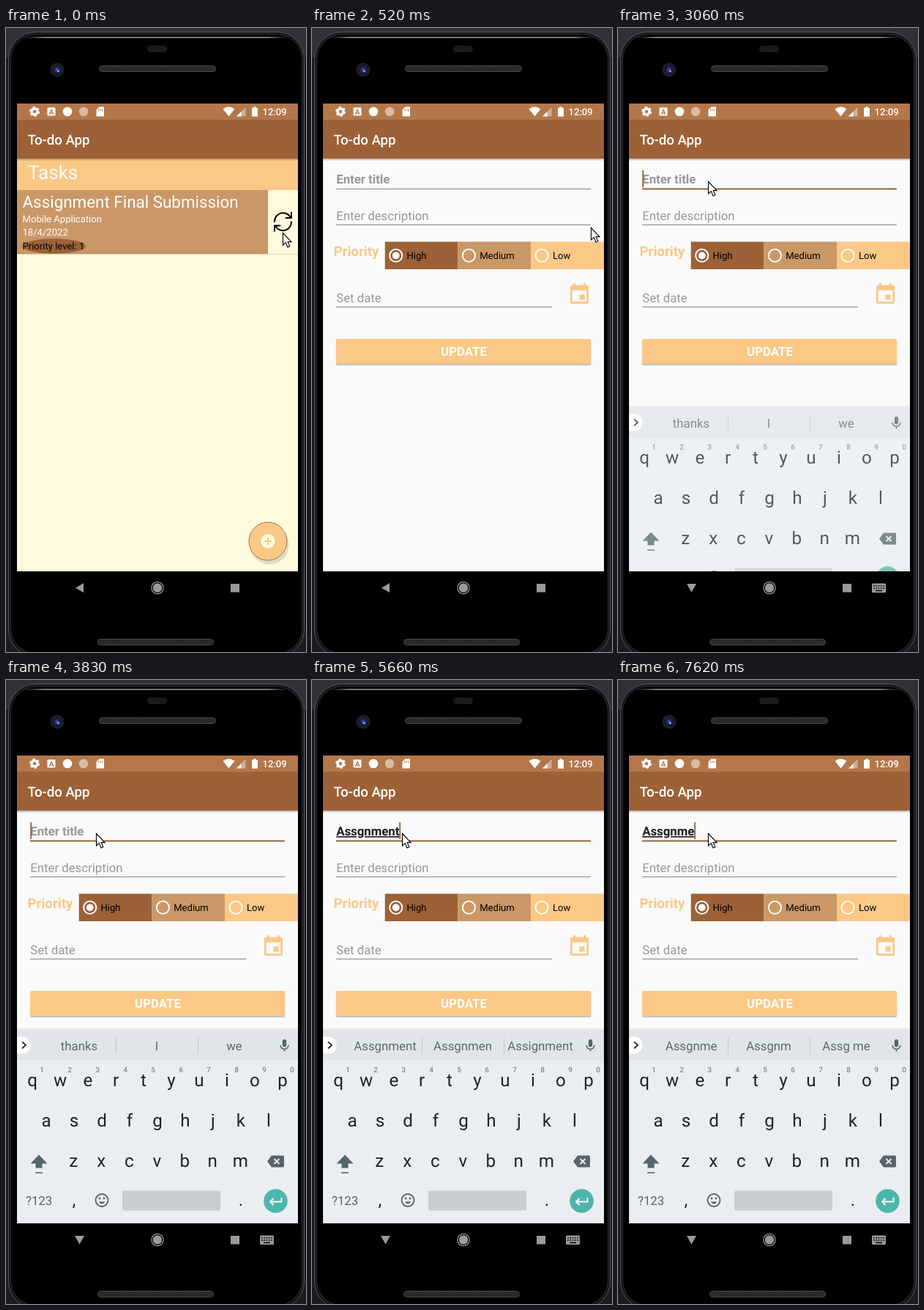
Animation, 410 px wide and 851 px high, one loop 8 s. Source, as an HTML page:

```html
<!DOCTYPE html>
<html lang="en">
<head>
<meta charset="utf-8">
<title>To-do App</title>
<style>
  html, body { margin: 0; width: 100%; height: 100%; overflow: hidden; background: #000; }
  svg { display: block; font-family: Roboto, sans-serif; text-rendering: geometricPrecision; }
  .b { font-weight: 700; }
  .mid { text-anchor: middle; }
  .s14 { font-size: 13.08px; }
  .s18 { font-size: 16.8px; }
  .hint { fill: #989898; }
  .line { stroke: #858585; }
  .key { font-size: 24.2px; fill: #17262c; }
  .num { font-size: 10px; font-weight: 500; fill: #7d888d; }
  #typed { fill: #1c1c1c; text-decoration: underline; text-decoration-skip-ink: none; }
</style>
</head>
<body>
<svg width="410" height="851" viewBox="0 0 410 851">
  <defs>
    <clipPath id="screen"><rect x="15" y="103" width="384" height="638"/></clipPath>
    <linearGradient id="shine">
      <stop offset="0" stop-color="#555a5f" stop-opacity="0"/>
      <stop offset=".08" stop-color="#8b9096"/>
      <stop offset=".92" stop-color="#8b9096"/>
      <stop offset="1" stop-color="#555a5f" stop-opacity="0"/>
    </linearGradient>
    <linearGradient id="drop" x2="0" y2="1">
      <stop offset="0" stop-opacity=".3"/>
      <stop offset="1" stop-opacity="0"/>
    </linearGradient>
    <radialGradient id="lens">
      <stop offset="0" stop-color="#5568c8"/>
      <stop offset=".45" stop-color="#1b2560"/>
      <stop offset="1" stop-color="#15161c"/>
    </radialGradient>
    <pattern id="mesh" width="3" height="4" patternUnits="userSpaceOnUse">
      <rect width="3" height="4" fill="#1b1a18"/>
      <path d="M0 4L3 0" stroke="#514d47"/>
    </pattern>
  </defs>

  <!-- phone body -->
  <rect width="410" height="851" fill="#303137"/>
  <rect y="40" width="410" height="811" fill="#1b1c1e"/>
  <rect x="3.5" y="5.5" width="404" height="852" rx="37" fill="#161719" stroke="#54575b"/>
  <rect x="6.5" y="9" width="398" height="844" rx="34" fill="#000" stroke="#2b2d30"/>
  <rect x="22" y="12" width="366" height="1.6" fill="url(#shine)"/>
  <rect x="193" y="24" width="27" height="9" rx="4.5" fill="#1a1a1b"/>
  <circle cx="70" cy="57" r="9.5" fill="#202024"/>
  <circle cx="70" cy="57" r="7" fill="url(#lens)"/>
  <circle cx="71.5" cy="59" r="1.3" fill="#a5b2f2"/>
  <g fill="url(#mesh)" stroke="#4a4843">
    <rect x="127.5" y="51.5" width="159" height="8" rx="4"/>
    <rect x="125.5" y="833.5" width="158" height="8" rx="4"/>
  </g>

  <!-- navigation bar -->
  <g fill="#9a9a9a">
    <path id="back" d="M95 763.5L106 757V770Z"/>
    <circle cx="207" cy="763.5" r="6.2"/>
    <circle cx="207" cy="763.5" r="8.2" fill="none" stroke="#9a9a9a" stroke-width="1.2"/>
    <rect x="307" y="758" width="12" height="11.5"/>
    <g id="switch">
      <rect x="347" y="757.5" width="19" height="12.5" rx="1.5"/>
      <path d="M349 760.8H364M349 764H364" stroke="#000" stroke-width="1.6" stroke-dasharray="1.8 1.5"/>
      <path d="M352 767.4H361" stroke="#000" stroke-width="1.5"/>
    </g>
  </g>

  <g clip-path="url(#screen)">
    <g id="list">
      <rect x="15" y="178" width="384" height="563" fill="#fffadd"/>
      <rect x="15" y="178" width="384" height="43" fill="#fbc886"/>
      <text x="30" y="206" font-size="26" fill="#fff">Tasks</text>
      <rect x="15" y="221" width="343" height="87" fill="#c99866"/>
      <path d="M15 308.5H399" stroke="#dcd7c2"/>
      <g fill="#fff" class="s14">
        <text x="22.5" y="245" font-size="22.4">Assignment Final Submission</text>
        <text x="22.5" y="265">Mobile Application</text>
        <text x="22.5" y="283">18/4/2022</text>
      </g>
      <ellipse cx="66" cy="297.5" rx="43" ry="10.3" fill="#9c6137"/>
      <text x="22.5" y="302" class="s14">Priority level: 1</text>
      <g fill="none" stroke="#000" stroke-width="2" stroke-linecap="round" stroke-linejoin="round">
        <path id="turn" d="M367 264A11.5 11.5 0 0 1 388.5 258M390 251.5V259H382.5"/>
        <use href="#turn" transform="rotate(180 378.5 264.2)"/>
      </g>
      <circle cx="360" cy="705" r="26.5" fill="#000" opacity=".12"/>
      <circle cx="358" cy="700" r="26" fill="#fbc886" stroke="#76644c" stroke-width=".8"/>
      <circle cx="358" cy="700" r="9.7" fill="#fffadd"/>
      <path d="M353 700H363M358 695V705" stroke="#fbc886" stroke-width="2"/>
    </g>

    <g id="form">
      <rect x="15" y="178" width="384" height="563" fill="#fafafa"/>
      <text id="title" x="33.2" y="212" class="b s18 hint">Enter title</text>
      <text id="typed" x="33.2" y="212" class="b s18"></text>
      <path id="rule" d="M33 219.5H381"/>
      <rect id="caret" y="194" width="1.8" height="23" fill="#9c6137"/>
      <text x="33.2" y="262" class="s18 hint">Enter description</text>
      <text x="33.2" y="374" class="s18 hint">Set date</text>
      <path class="line" d="M33 268.5H381M33 380.5H328"/>
      <text x="29.5" y="311" font-size="18.7" class="b" fill="#fbc886">Priority</text>
      <g id="radios" class="s14"></g>
      <path fill="#fbc886" transform="translate(348.7 346.6) scale(1.4)"
        d="M17 12h-5v5h5zM16 1v2H8V1H6v2H5a2 2 0 0 0-2 2V19a2 2 0 0 0 2 2H19a2 2 0 0 0 2-2V5a2 2 0 0 0-2-2h-1V1zM19 19H5V8H19z"/>
      <rect x="32.5" y="425.5" width="349" height="35" rx="2.5" fill="#000" opacity=".1"/>
      <rect x="33" y="424.5" width="348" height="35" rx="2" fill="#000" opacity=".22"/>
      <rect x="33" y="424" width="348" height="34.5" rx="2" fill="#fbc886"/>
      <text x="207.5" y="447" class="b s18 mid" fill="#fff">UPDATE</text>
    </g>

    <!-- status and app bars -->
    <rect x="15" y="103" width="384" height="22" fill="#b3774a"/>
    <rect x="15" y="125" width="384" height="53" fill="#9c6137"/>
    <rect x="15" y="178" width="384" height="3.5" fill="url(#drop)"/>
    <text x="29.5" y="159" font-size="18.7" font-weight="500" fill="#fff">To-do App</text>
    <g fill="#fff">
      <circle cx="39" cy="114" r="4" fill="none" stroke="#fff" stroke-width="3.4"/>
      <circle cx="39" cy="114" r="6" fill="none" stroke="#fff" stroke-width="2" stroke-dasharray="3.1 3.18"/>
      <rect x="56.5" y="108.5" width="11" height="11" rx="1"/>
      <text x="62" y="117.6" class="b mid" font-size="10" fill="#b3774a">A</text>
      <circle cx="84" cy="114" r="6.3"/>
      <circle cx="106" cy="114" r="6.3" opacity=".5"/>
      <path d="M127.5 107.5H134V120.5H123.5V111.5Z"/>
      <path d="M126.5 110.5V113M129 110.5V113M131.5 110.5V113" stroke="#b3774a"/>
      <path d="M296.5 110.5Q304.5 104.5 312.5 110.5L304.5 120.5Z"/>
      <path d="M315 120.5L327.5 108V120.5Z" opacity=".4"/>
      <path d="M315 120.5L321.5 114V120.5Z"/>
      <path d="M336 109H338.2V107.5H341.8V109H344V120.8H336Z"/>
      <text x="350.5" y="119" font-size="13.1" font-weight="500">12:09</text>
    </g>

    <g id="board">
      <rect x="15" y="475" width="384" height="3" fill="#000" opacity=".06"/>
      <rect x="15" y="477" width="384" height="264" fill="#ebeef1"/>
      <rect x="15" y="477" width="384" height="41.5" fill="#e0e5e8"/>
      <path d="M15 486.5H22A11.5 11.5 0 0 1 22 509.5H15Z" fill="#fff"/>
      <path d="M22 493.5L27 498L22 502.5" fill="none" stroke="#263238" stroke-width="1.8"/>
      <path d="M150.5 487V510M262.5 487V510" stroke="#c0c7cb"/>
      <g id="words" class="s18 mid" fill="#5b6a71"></g>
      <g fill="#56656b" stroke="#56656b" stroke-width="0">
        <rect x="377.8" y="490" width="5.4" height="10.5" rx="2.7"/>
        <path d="M375 498A5.5 5.5 0 0 0 386 498M380.5 503.5V506.5" fill="none" stroke-width="1.5"/>
        <path d="M45 647.5L56.5 659.5H49.5V665.5H40.5V659.5H33.5Z"/>
        <path d="M40 672H50" stroke-width="1.6"/>
        <path d="M363 648.5H378.5Q380 648.5 380 650V663Q380 664.5 378.5 664.5H363L357 656.5Z"/>
        <path d="M366.5 653L373.5 660M373.5 653L366.5 660" stroke="#ebeef1" stroke-width="1.8"/>
        <circle cx="131" cy="709.5" r="8.5" fill="none" stroke-width="1.8"/>
        <circle cx="128" cy="707" r="1.4"/>
        <circle cx="134" cy="707" r="1.4"/>
        <path d="M126.5 711.5Q131 717.5 135.5 711.5Z"/>
        <text x="27" y="716" class="s18">?123</text>
      </g>
      <rect x="159" y="696.5" width="134" height="27" rx="2.5" fill="#c8cdd0"/>
      <circle cx="368.5" cy="710.5" r="16.3" fill="#4db6ac"/>
      <path d="M376.5 706V711.5H361.5M365.5 707L361 711.5L365.5 716" fill="none" stroke="#fff" stroke-width="1.9"/>
      <g id="keys" class="mid"></g>
    </g>
  </g>

  <path id="mouse" d="M.5.5V17L4.3 13.6L7 20L9.8 18.8L7.1 12.6H12Z" fill="#fff" stroke="#000" stroke-width="1.1"/>
</svg>
<script>
const $ = id => document.getElementById(id);
const show = (id, on) => $(id).style.display = on ? '' : 'none';
const label = (x, y, s, cls) => `<text x="${x}" y="${y}" class="${cls}">${s}</text>`;

$('radios').innerHTML = [['High', '#9c6137'], ['Medium', '#c99866'], ['Low', '#fbc886']].map(([name, color], i) => {
  const x = 99.7 + i * 99.7;
  return `<rect x="${x}" y="291.5" width="99.8" height="37.5" fill="${color}"/>
    <circle cx="${x + 15}" cy="310.3" r="8.6" fill="none" stroke="#fff" stroke-width="1.9"/>
    ${i ? '' : `<circle cx="${x + 15}" cy="310.3" r="4.9" fill="#fff"/>`}
    ${label(x + 29.8, 315, name, '')}`;
}).join('');

$('words').innerHTML = [100, 206, 312].map(x => label(x, 505, '', '')).join('');
const words = $('words').children;

const row = (s, x, y) => [...s].map((c, i) => label(x + i * 38, y, c, 'key')).join('');
$('keys').innerHTML = row('qwertyuiop', 36, 554) + row('asdfghjkl', 55, 609) + row('zxcvbnm', 92.3, 664) +
  label(93, 717, ',', 'key') + label(321, 717, '.', 'key') +
  [...'1234567890'].map((c, i) => label(49 + i * 38, 534.5, c, 'num')).join('');

// start time, field text, suggestions
const typing = [
  [0, '', 'thanks|I|we'],
  [3960, 'A', 'A|I|Are'],
  [4230, 'As', 'As|A|Ask'],
  [4490, 'Ass', 'Ass|As|Ask'],
  [4740, 'Assg', 'Assg|Ass|Asst'],
  [4860, 'Assgn', 'Assgn|Assg|Agnes'],
  [5390, 'Assgnm', 'Assgnm|Assgn|Assg my'],
  [5540, 'Assgnmen', 'Assgnmen|Assgnme|Assg men'],
  [5660, 'Assgnment', 'Assgnment|Assgnmen|Assignment'],
  [6060, 'Assgnmen', 'Assgnmen|Assgnme|Assg men'],
  [6180, 'Assgnme', 'Assgnme|Assgnm|Assg me'],
  [6460, 'Assgn', 'Assgnm|Assgn|Assg my'],
  [6580, 'Assgn', 'Assgn|Assg|Agnes'],
  [6830, 'Assg', 'Assg|Ass|Asst'],
  [7200, 'Assgn', 'Assgn|Assg|Agnes'],
  [7500, 'Assgnm', 'Assgnm|Assgn|Assg my'],
  [7620, 'Assgnme', 'Assgnme|Assgnm|Assg me']
];

// stepped progress, one step every 120 ms, eased
function glide(t, start, steps) {
  const p = Math.max(0, Math.min(steps, Math.floor((t - start) / 120) + 1)) / steps;
  return p * p * (3 - 2 * p);
}

function draw(t) {
  const form = t >= 520, focus = t >= 2940, board = t >= 3060;
  show('list', !form);
  show('form', form);

  const a = glide(t, 940, 7), b = glide(t, 1920, 4);
  const x = t < 120 ? 378 : 381 - 253 * a - 5 * b;
  const y = t < 120 ? 279 : 272 - 57 * a - 6 * b;
  $('mouse').setAttribute('transform', `translate(${x} ${y})`);

  const [, text, tips] = typing.findLast(s => t >= s[0]);
  $('typed').textContent = text;
  show('title', !text);
  tips.split('|').forEach((s, i) => words[i].textContent = s);

  $('rule').setAttribute('stroke', focus ? '#9c6137' : '#858585');
  $('rule').setAttribute('stroke-width', focus ? 2 : 1);
  show('caret', focus && !(t >= 3430 && t < 3830));
  $('caret').setAttribute('x', text ? 33 + $('typed').getComputedTextLength() : 33.2);

  const rising = t < 3180;
  show('board', board);
  $('board').setAttribute('transform', `translate(0 ${rising ? 40 : 0})`);
  $('board').setAttribute('opacity', rising ? .75 : 1);
  $('back').setAttribute('d', board ? 'M94 758H107L100.5 769.5Z' : 'M95 763.5L106 757V770Z');
  show('switch', board);
}

function tick() {
  draw(performance.now() % 8000);
  requestAnimationFrame(tick);
}
tick();
</script>
</body>
</html>
```
